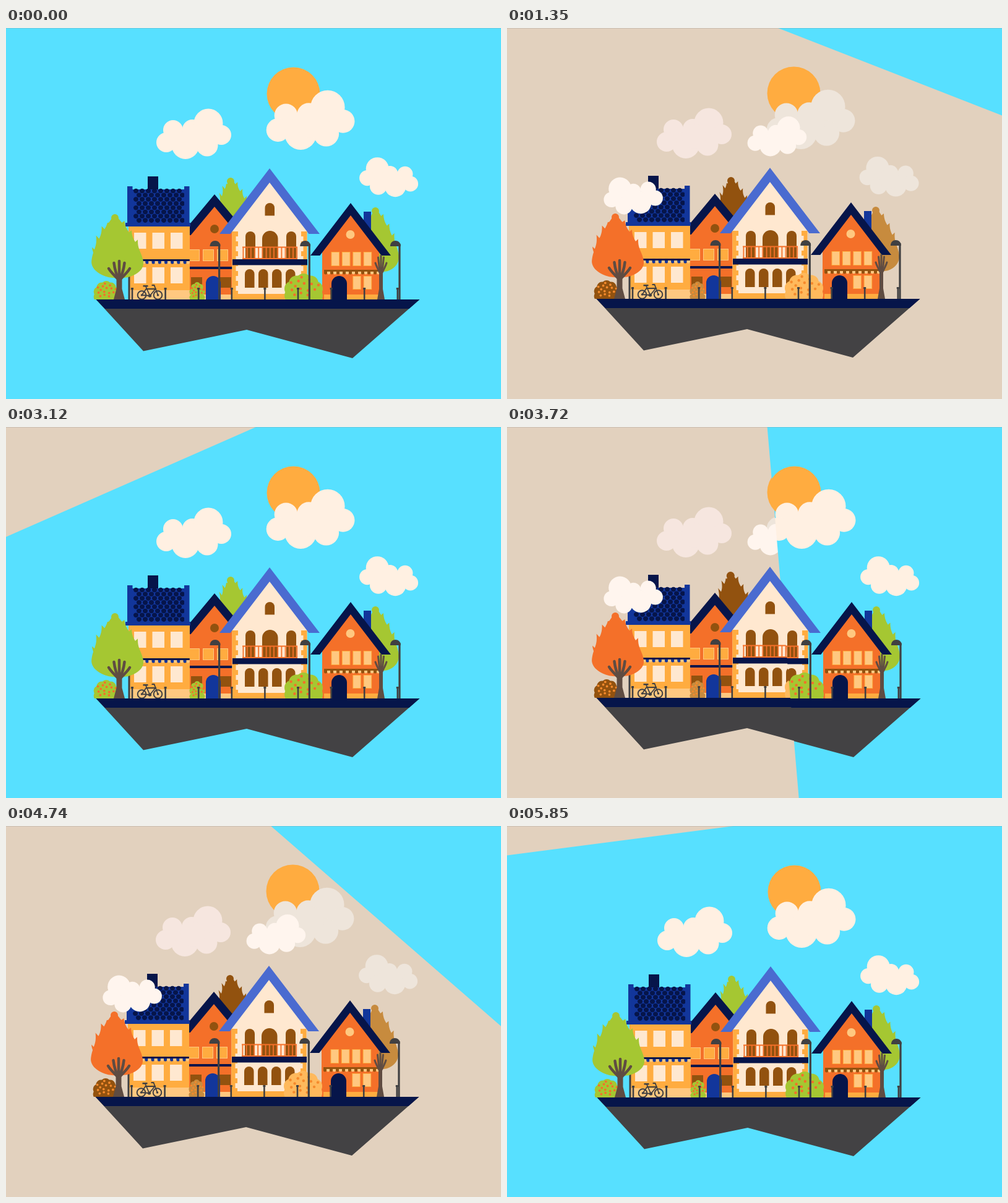
Recreate the animation shown at these times as an HTML page with a canvas. Size 800 by 600 pixels, loop 5.88 s.

```html
<!DOCTYPE html>
<html lang="en">
<head>
<meta charset="utf-8">
<title>Two seasons</title>
<style>
html, body { margin: 0; width: 100%; height: 100%; overflow: hidden; background: #57e0ff; }
canvas { display: block; width: 800px; height: 600px; }
</style>
</head>
<body>
<canvas id="stage" width="800" height="600"></canvas>
<script>
const stage = document.getElementById('stage').getContext('2d');
const layer = document.createElement('canvas');
layer.width = 800;
layer.height = 600;
const ctx = layer.getContext('2d');

const TAU = Math.PI * 2;
const HALF = 1470, STEP = 30;
const PIVOT = { x: 420, y: -7 };
const GROUND = 439;

const C = {
  navy: '#06154a', blue: '#12369b', sky: '#4a6bd0', orange: '#f47029', amber: '#ffac40',
  peach: '#ffc880', cream: '#ffe8d0', brown: '#92520f', tan: '#c78b3e', green: '#a5c732',
  dark: '#404042', trunk: '#5f4c42'
};
const SUMMER = {
  sky: '#57e0ff', shift: 0, clouds: ['#fff0e2', '#fff0e2', '#fff0e2'],
  trees: [C.green, C.green, C.green], bushes: [C.green, C.green, C.green], dots: C.orange
};
const AUTUMN = {
  sky: '#e2d1be', shift: -1, clouds: ['#f6e6df', '#eee5db', '#eee5db'], mist: '#fff5ee',
  trees: [C.orange, C.brown, C.tan], bushes: [C.brown, C.tan, '#ffb95c'], dots: '#f58a2c'
};

// Divider angle in degrees: sweeps down to autumn, then back up to summer.
function angleAt(t) {
  const u = (t % HALF) / HALF;
  return t < HALF ? 178.4 - 182.3 * u + 12.3 * u * u : 12.1 + 118.5 * u + 46.3 * u * u;
}

// Draws around a point, with an overshoot just after the divider has passed it.
function popped(scene, t, x, y, baseY, paint) {
  const at = Math.atan2(y - PIVOT.y, x - PIVOT.x) * 360 / TAU;
  const rising = t >= HALF, passed = (angleAt(t) - at) * (rising ? 1 : -1) / 31;
  const active = rising === (scene === SUMMER) && passed > 0 && passed < 1;
  const s = active ? 1 + .09 * Math.sin(Math.PI * passed) : 1;
  ctx.save();
  ctx.translate(x, baseY);
  ctx.scale(s, s);
  paint();
  ctx.restore();
}

function box(x, y, w, h, color) {
  ctx.fillStyle = color;
  ctx.fillRect(x, y, w, h);
}
function disc(x, y, r, color) {
  ctx.fillStyle = color;
  ctx.beginPath();
  ctx.arc(x, y, r, 0, TAU);
  ctx.fill();
}
function poly(color, ...p) {
  ctx.fillStyle = color;
  ctx.beginPath();
  for (let i = 0; i < p.length; i += 2) ctx.lineTo(p[i], p[i + 1]);
  ctx.fill();
}
function line(width, color, ...p) {
  ctx.strokeStyle = color;
  ctx.lineWidth = width;
  ctx.beginPath();
  for (let i = 0; i < p.length; i += 2) ctx.lineTo(p[i], p[i + 1]);
  ctx.stroke();
}
function arch(x, y, w, h, color) {
  const r = w / 2;
  ctx.fillStyle = color;
  ctx.beginPath();
  ctx.arc(x + r, y + r, r, Math.PI, TAU);
  ctx.lineTo(x + w, y + h);
  ctx.lineTo(x, y + h);
  ctx.fill();
}
function row(n, x, gap, paint) {
  for (let i = 0; i < n; i++) paint(x + i * gap, i);
}

// Gable roof with the wall below it.
function gable(x, top, half, eave, thick, roof, wall, wallHalf) {
  const inner = half * (1 - thick / (eave - top));
  const wallY = top + thick / 2 + wallHalf * (eave - top) / half;
  poly(wall, x, top + thick / 2, x + wallHalf, wallY, x + wallHalf, GROUND, x - wallHalf, GROUND, x - wallHalf, wallY);
  poly(roof, x, top, x + half, eave, x + inner, eave, x, top + thick, x - inner, eave, x - half, eave);
}
function awning(x, y, n, gap, top, a, b) {
  row(n, x, gap, (sx, i) => {
    const color = i % 2 ? b : a;
    box(sx, y, gap, 4, color);
    disc(sx + gap / 2, y + 4, gap / 2, color);
  });
  box(x, y - 1, n * gap, 3, top);
}

const PUFFS = [[-33, -6, 16], [-2, -7, 16], [24, -17, 23.5], [45, 2, 16], [22, 19, 17.5], [-13, 19, 22], [-44, 14, 16]];
function cloud(scene, t, x, y, size, flip, color, tilt = 0) {
  popped(scene, t, x, y, y, () => {
    ctx.rotate(tilt);
    ctx.scale(flip ? -size : size, size);
    for (const [px, py, r] of PUFFS) disc(px, py, r, color);
    disc(0, 5, 20, color);
  });
}

// Flame-like crown: a teardrop whose upper edge is cut into upward teeth.
function crown(scene, t, tipX, x, top, base, half, color) {
  const h = base - top, steps = 60;
  popped(scene, t, x, base - h * .45, base, () => {
    ctx.fillStyle = color;
    ctx.beginPath();
    for (let i = 0; i <= 2 * steps; i++) {
      const side = i < steps ? 1 : -1, v = 1 - Math.abs(steps - i) / steps;
      const d = 1 - v;
      const k = side > 0 ? v : v;
      const w = k < .75 ? 1 - ((.75 - k) / .75) ** 1.5 : Math.sqrt(1 - ((k - .75) / .25) ** 2);
      const f = (k * 6.5 + (side > 0 ? .15 : .4)) % 1;
      const tooth = k > .15 && k < .6 ? (1 - f) ** 3 : 0;
      const bx = (tipX - x) * d + side * (half * w + 4 * tooth);
      ctx.lineTo(bx, -h * d - 7 * tooth);
    }
    ctx.fill();
    disc(tipX - x, 6 - h, 6, color);
  });
}
function trunk(x, fork, spread, width) {
  poly(C.trunk, x - width / 2, fork, x + width / 2, fork, x + width / 2, 422, x + width, GROUND, x - width, GROUND, x - width / 2, 422);
  ctx.strokeStyle = C.trunk;
  ctx.lineWidth = width * .5;
  ctx.lineCap = 'round';
  for (let i = -2; i <= 2; i++) {
    ctx.beginPath();
    ctx.moveTo(x, fork + 5);
    ctx.quadraticCurveTo(x + i * spread * .8, fork - 8, x + i * spread, fork - 26 + i * i * 3);
    ctx.stroke();
  }
  ctx.lineCap = 'butt';
}
function bush(x, half, top, color, dots) {
  const h = GROUND - top, r = half * .38;
  ctx.save();
  ctx.beginPath();
  ctx.rect(x - half * 2, 0, half * 4, GROUND);
  ctx.clip();
  disc(x, GROUND - h * .35, half * .8, color);
  for (let i = 0; i < 7; i++) {
    const a = Math.PI * (1.1 - i * .2);
    disc(x + (half - r) * Math.cos(a), GROUND - h * .28 - (h * .72 - r) * Math.sin(a), r, color);
  }
  for (let i = 1; i < 16; i++) {
    const a = i * 2.4, d = Math.sqrt(i / 16) * .85;
    disc(x + half * d * Math.cos(a), GROUND - h * (.48 - d * .46 * Math.sin(a)), 1.2 + half / 32, dots);
  }
  ctx.restore();
}

function leftHouse() {
  box(229, 240, 17, 24, C.navy);
  box(204, 261, 85, 56, C.blue);
  for (let r = 0; r < 8; r++)
    row(8, 206 + (r % 2) * 5, 10, x => {
      box(x, 262 + r * 6.8, 8, 2, C.navy);
      disc(x + 4, 263.5 + r * 6.8, 3.8, C.navy);
    });
  row(2, 196, 92, x => box(x, 256, 8.5, 62, C.blue));
  box(193, 315, 105, 6, C.blue);
  box(198, 321, 99, 118, C.amber);
  box(198, 424, 99, 15, C.peach);
  row(3, 207, 29.5, x => {
    box(x, 331, 19.5, 26, C.cream);
    box(x, 387, 19.5, 26, C.cream);
  });
  awning(205, 375, 18, 5.1, C.navy, C.blue, C.peach);
}
function backHouse() {
  gable(337, 269, 55, 335, 20, C.navy, C.orange, 41);
  disc(337, 325, 7, C.brown);
  row(3, 295, 23, x => {
    box(x, 358, 18, 19, C.peach);
    box(x + 1, 359, 16, 17, C.amber);
  });
  box(297, 386, 70, 4, C.navy);
  row(2, 299, 47, x => box(x, 403, 18, 17, C.brown));
  box(297, 431, 70, 8, C.peach);
  arch(323, 401, 24, 38, C.blue);
}
function centerHouse() {
  gable(426, 227, 81, 333, 23, C.sky, C.cream, 60.5);
  row(7, 329, 16, (y, i) => {
    for (let k = 0; k < 2; k++) {
      const w = k ? 6 : 9.5;
      box(365.5, y + k * 8, w, 8, C.amber);
      box(486.5 - w, y + k * 8, w, 8, C.amber);
    }
  });
  box(366, 430, 121, 9, C.amber);
  arch(418.5, 283, 15.5, 20.5, C.brown);
  row(2, 387, 66, x => arch(x, 329, 16, 44, C.brown));
  arch(414, 328, 25.5, 45, C.brown);
  row(15, 382.5, 6.2, x => box(x, 354, 1.8, 19, C.orange));
  row(2, 353.5, 18.5, y => box(382, y, 89, 2, C.orange));
  box(366, 374, 121, 9.5, C.navy);
  row(4, 386, 22, x => arch(x, 390, 15.5, 30, C.brown));
}
function rightHouse() {
  box(578, 297, 12, 30, C.blue);
  gable(557, 283, 65, 368, 20, C.navy, C.orange, 46);
  disc(556.5, 334, 7, C.peach);
  row(4, 525.5, 17.4, (x, i) => {
    const pane = (y, h) => {
      box(x, y, 13.5, h, C.amber);
      box(x + 1, y + 1, 11.5, h - 2, C.peach);
    };
    pane(362, 23);
    if (i > 1) pane(401, 22);
  });
  awning(514, 392, 18, 5, C.brown, C.brown, C.peach);
  box(514, 431, 90, 8, C.amber);
  arch(526, 401, 25, 38, C.navy);
}

function lamp(x) {
  box(x - 1.5, 349, 3.2, 90, C.dark);
  ctx.fillStyle = C.dark;
  ctx.beginPath();
  ctx.moveTo(x - 15, 353);
  ctx.bezierCurveTo(x - 15, 341, x + 2, 341, x + 2, 353);
  ctx.fill();
}
function bollard(x) {
  box(x - 1.3, 421, 2.6, 18, C.dark);
  box(x - 2, 420, 4, 3, C.dark);
}
function bike(x, y) {
  ctx.save();
  ctx.translate(x, y);
  row(2, -13, 26, wx => {
    ctx.strokeStyle = C.dark;
    ctx.lineWidth = 2;
    ctx.beginPath();
    ctx.arc(wx, 0, 6.8, 0, TAU);
    ctx.stroke();
    disc(wx, 0, 1.8, C.dark);
  });
  line(1.8, C.dark, -13, 0, -6, -10, 9, -10, 0, 1, -13, 0);
  line(1.8, C.dark, 0, 1, -7, -15);
  line(1.8, C.dark, 13, 0, 7, -16, 3, -16);
  box(-11, -16, 8, 2.5, C.dark);
  disc(0, 1, 2.6, C.dark);
  ctx.restore();
}
function island() {
  poly('#434244', 145.5, 439, 668.5, 439, 560, 534, 389, 488, 222, 522.5);
  poly(C.navy, 145.5, 439, 668.5, 439, 651.5, 454, 160, 454);
}

function drawScene(s, t) {
  ctx.setTransform(1, 0, 0, 1, 0, 0);
  box(0, 0, 800, 600, s.sky);
  ctx.translate(s.shift, s.shift);

  popped(s, t, 464.5, 106.5, 106.5, () => disc(0, 0, 43, C.amber));
  cloud(s, t, 303, 171, 1, false, s.clouds[0]);
  cloud(s, t, 491.5, 148.5, 1.18, false, s.clouds[1]);
  cloud(s, t, 619, 241, .785, true, s.clouds[2]);

  crown(s, t, 363, 371, 242, 320, 26, s.trees[1]);
  crown(s, t, 597, 605, 290, 395, 32, s.trees[2]);
  backHouse();
  leftHouse();
  centerHouse();
  rightHouse();
  trunk(606, 394, 4.5, 6);

  box(197.5, 400, 3, 39, C.dark);
  bush(162, 21, 409, s.bushes[0], s.dots);
  crown(s, t, 176, 181.5, 301, 405, 42, s.trees[0]);
  trunk(183, 403, 8.5, 9);
  bush(309, 13, 411, s.bushes[1], s.dots);
  bush(481, 32, 397, s.bushes[2], s.dots);
  row(9, 204, 53.6, bollard);
  bike(232.5, 432);
  row(3, 344.5, 145.7, lamp);
  island();

  if (s.mist) {
    cloud(s, t, 437, 176, .79, false, s.mist);
    cloud(s, t, 204.5, 271, .785, true, s.mist, -.17);
  }
}

function draw(t) {
  const a = angleAt(t) * TAU / 360;
  drawScene(SUMMER, t);
  stage.drawImage(layer, 0, 0);
  // Past 178 degrees the divider lies outside the stage.
  if (a < Math.PI * 178 / 180) {
    drawScene(AUTUMN, t);
    stage.save();
    stage.beginPath();
    stage.moveTo(PIVOT.x, PIVOT.y);
    stage.arc(PIVOT.x, PIVOT.y, 1200, a, Math.PI);
    stage.clip();
    stage.drawImage(layer, 0, 0);
    stage.restore();
  }
  stage.fillStyle = 'rgba(150,150,150,.3)';
  stage.fillRect(0, 0, 800, 1);
}

const start = performance.now();
function tick() {
  const t = (performance.now() - start) % (2 * HALF);
  draw(Math.floor(t / STEP) * STEP);
  requestAnimationFrame(tick);
}
tick();
</script>
</body>
</html>
```
